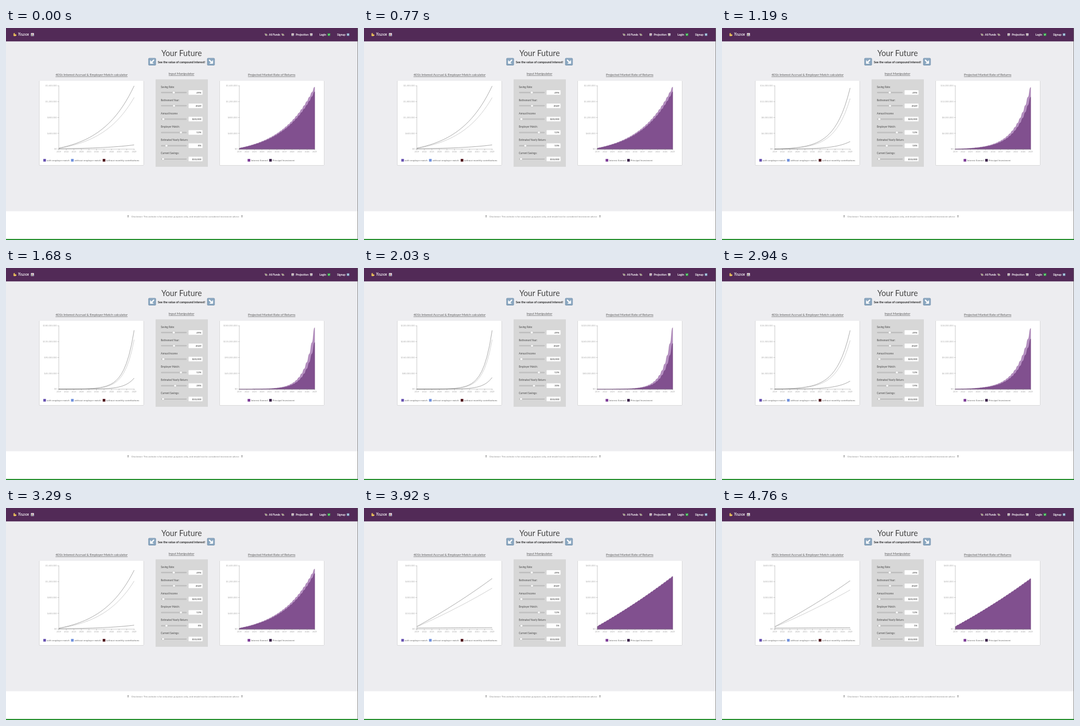
Write an HTML page that moves like this. It is 640x385 px and loops after 4.83 s.

```html
<!DOCTYPE html>
<html lang="en">
<head>
<meta charset="utf-8">
<title>Your Future</title>
<style>
  html, body { margin: 0; height: 100%; overflow: hidden; }
  svg { display: block; width: 100vw; height: 100vh; font-family: Lato, sans-serif; }
  .head { font-size: 5.9px; fill: #555; text-anchor: middle; text-decoration: underline; }
  .nav { font-size: 5px; font-weight: 700; fill: #fff; }
  .label { font-size: 4.6px; font-weight: 600; fill: #5c5c5c; }
  .value { font-size: 4.5px; font-weight: 600; fill: #444; text-anchor: end; }
  .legend { font-size: 4.5px; fill: #666; }
  .tick { font-size: 4.1px; fill: #aaa; text-anchor: end; }
  .year { font-size: 3.6px; fill: #aaa; text-anchor: middle; }
  .card { fill: #fff; filter: drop-shadow(.9px .9px .5px #777); }
  .line { fill: none; stroke-width: .55; }
</style>
</head>
<body>
<svg id="stage" viewBox="0 0 640 385" preserveAspectRatio="none">
  <rect width="640" height="385" fill="#fff"/>
  <rect y="24" width="640" height="308.7" fill="#ededf0"/>
  <rect width="640" height="24.3" fill="#522a57"/>
  <rect x="639.2" width=".8" height="385" fill="#777"/>
  <rect y="383.2" width="640" height="1.8" fill="#0f8419"/>
  <text x="319.3" y="50.6" font-size="14.4" fill="#444" text-anchor="middle">Your Future</text>
  <text x="319" y="64.4" font-size="5.4" font-weight="700" fill="#222" text-anchor="middle">See the value of compound interest!</text>
  <text x="326" y="344" font-size="4.3" fill="#888" text-anchor="middle">Disclaimer: This website is for education purposes only, and should not be considered investment advice</text>
</svg>
<script>
const stage = document.getElementById('stage');
const LOOP = 4830, STEP = 70, YEARS = 29;
const BASE = 220, HEIGHT = 115;
const SAVINGS = 10000, OWN = 9800, MATCH = 2400;

function add(tag, attrs, content = '') {
  const el = document.createElementNS('http://www.w3.org/2000/svg', tag);
  for (const key in attrs) el.setAttribute(key, attrs[key]);
  el.textContent = content;
  stage.append(el);
  return el;
}
const text = (cls, x, y, content) => add('text', { class: cls, x, y }, content);
const rect = (x, y, width, height, fill, rx = 0) => add('rect', { x, y, width, height, fill, rx });
const path = (d, stroke, width = .6, fill = 'none') =>
  add('path', { d, stroke, fill, 'stroke-width': width, 'stroke-linecap': 'round', 'stroke-linejoin': 'round' });

// Header
add('text', { x: 22, y: 14.2, class: 'nav', 'font-style': 'italic', 'font-variant': 'small-caps', style: 'font-size:6.6px' }, 'Yeldor');
path('M14.2 9.8 L16 9.6 L15.6 12 Q18.8 11 19 13.2 Q17.5 15 14 14.2 Z', '#e8b84a', .5, '#f3cd62');
for (const [x, y, content] of [[478, 14, 'All Funds'], [527, 14, 'Projection'], [570, 14, 'Login'], [602, 14, 'Signup']])
  text('nav', x, y, content);
function chartIcon(x, y, size) {
  rect(x, y, size, size, '#e9e9ee', .4);
  [['#4a9d62', .5], ['#c65353', .75], ['#4d78b8', .35]].forEach(([color, h], i) =>
    rect(x + size * (.15 + i * .26), y + size * (.92 - h), size * .17, size * h, color));
}
chartIcon(45.4, 9.2, 5.4);
chartIcon(519, 9.8, 4.4);
chartIcon(552.8, 9.8, 4.4);
for (const x of [470.8, 501.3]) {
  path(`M${x} 10.4 l3.2 .5 l1.3 2.6 l-3.2 -.5 Z`, '#e7c9bd', .5, '#8fa77f');
  path(`M${x + .4} 12.6 l2 1.4`, '#f0dfe0', .7);
}
rect(584.8, 9.7, 4.6, 4.6, '#35b54a', .6);
path('M586 12 l.9 1 l1.5 -2', '#fff', .6);
rect(619.6, 9.7, 4.6, 4.6, '#7fa6c6', .6);
path('M621.9 13.4 v-2.6 m-1.1 1.1 l1.1 -1.1 l1.1 1.1', '#fff', .6);

// Arrow badges beside the subtitle
for (const [cx, dir] of [[265.7, -1], [372.6, 1]]) {
  rect(cx - 6.9, 54.5, 13.8, 13.6, '#6e8ca9', 1.8);
  rect(cx - 6.2, 55.1, 12.4, 12.2, '#8ba7c0', 1.4);
  path(`M${cx - dir * 2.8} 58.4 L${cx + dir * 2} 63.2`, '#fff', 2.2);
  path(`M${cx + dir * 3.4} 59.2 v5.2 h${-dir * 5.2} Z`, '#fff', .8, '#fff');
}

for (const x of [220.6, 427.5])
  add('text', { x, y: 344.2, 'font-size': 5.4, 'font-weight': 700, fill: '#666' }, '!!');

text('head', 155.5, 87.3, '401k Interest Accrual & Employer Match calculator');
text('head', 319, 85.2, 'Input Manipulator');
text('head', 483, 87.3, 'Projected Market Rate of Returns');

// Slider panel
rect(272, 93.3, 95, 158.7, '#d7d7d7');
let rateKnob, rateValue;
[['Saving Rate:', 305, '49%'], ['Retirement Year:', 305.5, '2049'], ['Annual Income', 286, '$20,000'],
 ['Employer Match:', 318, '12%'], ['Estimated Yearly Return:', 292, '8%'], ['Current Savings:', 285.5, '$10,000']]
.forEach(([name, x, content], i) => {
  const y = 117.2 + i * 24.15;
  text('label', 281.5, y - 8.6, name);
  rect(282, y - 1, 46.5, 2, '#a9a9a9', 1);
  rect(282.4, y - .6, 45.7, 1.2, '#c6c6c6', .6);
  const knob = add('circle', { cx: x, cy: y, r: 2.4, fill: '#f6f6f6', stroke: '#aaa', 'stroke-width': .4 });
  rect(332, y - 4.2, 25.3, 8.3, '#fff', .5);
  const value = text('value', 355.2, y + 1.6, content);
  if (i === 4) [rateKnob, rateValue] = [knob, value];
});

// Charts
function card(x) {
  add('rect', { class: 'card', x, y: 96, width: 189.8, height: 153.6, rx: 1 });
}
function axes(x0, width) {
  let d = `M${x0} ${BASE - HEIGHT} V${BASE} H${x0 + width}`;
  for (let k = 0; k <= 10; k++) {
    const x = x0 + width * k / 10;
    d += `M${x} ${BASE} v1.6`;
    text('year', x, 225.6, 2019 + 3 * k);
  }
  for (let k = 0; k < 5; k++) d += `M${x0} ${BASE - HEIGHT * k / 4} h-1.8`;
  path(d, '#8a8a8a', .45);
  return [0, 1, 2, 3, 4].map(k => text('tick', x0 - 3.4, BASE + 1.4 - HEIGHT * k / 4, ''));
}
function legend(items) {
  for (const [x, color, name] of items) {
    rect(x, 237.8, 4.8, 4.8, color);
    text('legend', x + 6.2, 241.8, name);
  }
}
const LEFT = { x: 96, width: 137 }, RIGHT = { x: 424.2, width: 137 };
card(60.5);
card(388.5);
const interest = path('', '#75477f', .35, '#b58fc1');
const principal = path('', '#5d2f6c', .35, '#81508f');
const tickSets = [axes(LEFT.x, LEFT.width), axes(RIGHT.x, RIGHT.width)];
const lines = ['#666', '#aaa', '#666'].map(stroke => add('path', { class: 'line', stroke }));
legend([[67.8, '#6650b0', 'with employer match'], [118.2, '#7090dc', 'without employer match'],
        [175.8, '#4b0a14', 'without monthly contributions']]);
legend([[439.3, '#7b3a96', 'Interest Earned'], [478.5, '#361a45', 'Principal Investment']]);

// Balance with monthly compounding; the first year's deposit is there from the start
const yearlyGrowth = rate => (1 + rate / 1200) ** 12;
function balance(rate, deposit, year) {
  const growth = yearlyGrowth(rate) ** year;
  return SAVINGS * growth + deposit * (1 + (growth - 1) / (rate / 100));
}

function niceStep(value) {
  const unit = 10 ** Math.floor(Math.log10(value));
  return unit * [1, 1.5, 2, 2.5, 3, 4, 4.5, 5, 6, 8, 10].find(n => n * unit >= value);
}

const points = (valueAt, { x, width }) => Array.from({ length: YEARS + 1 }, (_, i) =>
  [x + width * i / YEARS, BASE - valueAt(i)].map(v => +v.toFixed(2)));

const linePath = (valueAt, box) => 'M' + points(valueAt, box).join('L');

// Softened stairs: level at each year, steep in between
function stairPath(valueAt, box) {
  const list = points(valueAt, box);
  let d = `M${box.x} ${BASE}L${list[0]}`;
  for (let i = 1; i < list.length; i++) {
    const [x0, y0] = list[i - 1], [x1, y1] = list[i], mid = (x0 + x1) / 2;
    d += `C${mid} ${y0} ${mid} ${y1} ${x1} ${y1}`;
  }
  return d + `V${BASE}Z`;
}

// time, shown return, return of the drawn curves (which lag), end of the top line and of the area
const KEYS = [[0, 8, 8, 1, .98], [770, 10, 8, .997, .98], [1680, 28, 28, .93, .97], [2520, 33, 33, .925, .97],
              [3290, 8, 8, .93, .95], [3920, 1, 1, .8, .835], [4760, 1, 1, .765, .8]];

function stateAt(time) {
  const t = Math.min(time, 4760);
  const n = KEYS.findIndex(key => key[0] >= t);
  if (n < 1) return KEYS[0];
  const a = KEYS[n - 1], b = KEYS[n], p = (t - a[0]) / (b[0] - a[0]);
  return a.map((v, i) => v + (b[i] - v) * p);
}

function draw(time) {
  const [, target, rate, lineEnd, areaEnd] = stateAt(time);
  const shown = Math.round(target);
  const total = balance(rate, OWN + MATCH, YEARS);
  const lineScale = HEIGHT * lineEnd / total, areaScale = HEIGHT * areaEnd / total;

  [OWN + MATCH, OWN, 0].forEach((deposit, k) =>
    lines[k].setAttribute('d', linePath(i => balance(rate, deposit, i) * lineScale, LEFT)));
  const area = i => balance(rate, OWN + MATCH, i) * areaScale;
  interest.setAttribute('d', stairPath(area, RIGHT));
  principal.setAttribute('d', stairPath(i => area(i) / yearlyGrowth(rate), RIGHT));

  const step = niceStep(balance(shown, OWN + MATCH, YEARS) / 4);
  for (const ticks of tickSets)
    ticks.forEach((tick, k) => tick.textContent = '$' + (step * k).toLocaleString('en-US'));
  rateKnob.setAttribute('cx', 285.4 + .79 * shown);
  rateValue.textContent = shown + '%';
}

function frame() {
  const time = performance.now() % LOOP;
  draw(Math.floor(time / STEP) * STEP);
  requestAnimationFrame(frame);
}
frame();
</script>
</body>
</html>
```
